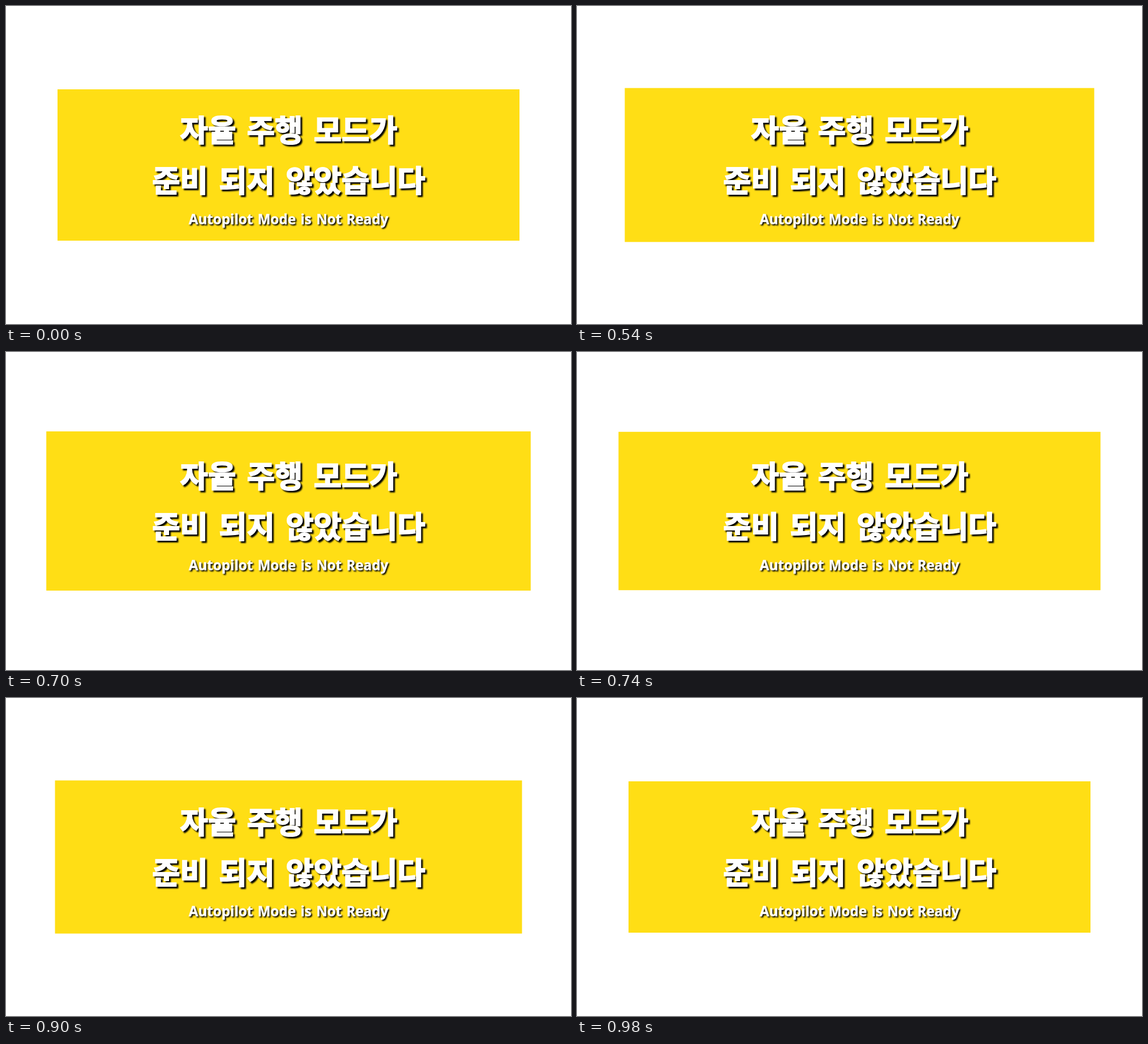
Write an HTML page that moves like this. It is 998 by 561 pixels and loops after 5810 ms.

```html
<!DOCTYPE html>
<html lang="ko">
<head>
<meta charset="utf-8">
<style>
  html, body { margin: 0; width: 100%; height: 100%; overflow: hidden; background: #fff; }
  svg { display: block; width: 998px; height: 561px; }
  text { fill: #fff; stroke: #fff; text-anchor: middle; }
  .korean {
    font: 700 53.6px "Noto Sans CJK KR", "Noto Sans CJK", sans-serif;
    word-spacing: 4.3px;
    stroke-width: 2px;
    filter: drop-shadow(3px 3px 1px #000);
  }
  .english {
    font: 700 24.2px "Noto Sans", sans-serif;
    word-spacing: 2px;
    stroke-width: .4px;
    filter: drop-shadow(2.5px 2.5px 1px #000);
  }
</style>
</head>
<body>
<svg viewBox="0 0 998 561">
  <rect id="banner" fill="#ffde15"/>
  <text class="korean" x="499.5" y="238.5">자율 주행 모드가</text>
  <text class="korean" x="499.5" y="328">준비 되지 않았습니다</text>
  <text class="english" x="499" y="385">Autopilot Mode is Not Ready</text>
</svg>
<script>
  const LOOP = 5810, START = 500, STEP = 40;
  const PEAK = 707, HALF_PULSE = 247, MAX_GROWTH = 20.4;
  const banner = document.getElementById("banner");
  const origin = performance.now();

  // Linear swell and shrink, held for 40 ms at a time.
  function growth(time) {
    const held = START + Math.floor((time - START) / STEP) * STEP;
    return MAX_GROWTH * Math.max(0, 1 - Math.abs(held - PEAK) / HALF_PULSE);
  }

  function draw(time) {
    const dx = growth(time), dy = dx * 0.35;
    const box = { x: 91 - dx, y: 147 - dy, width: 816 + 2 * dx, height: 267 + 2 * dy };
    for (const name in box) banner.setAttribute(name, box[name]);
  }

  function tick(now) {
    const time = Math.max(0, now - origin) % LOOP;
    draw(time < START ? 0 : time);
    requestAnimationFrame(tick);
  }

  draw(0);
  requestAnimationFrame(tick);
</script>
</body>
</html>
```
